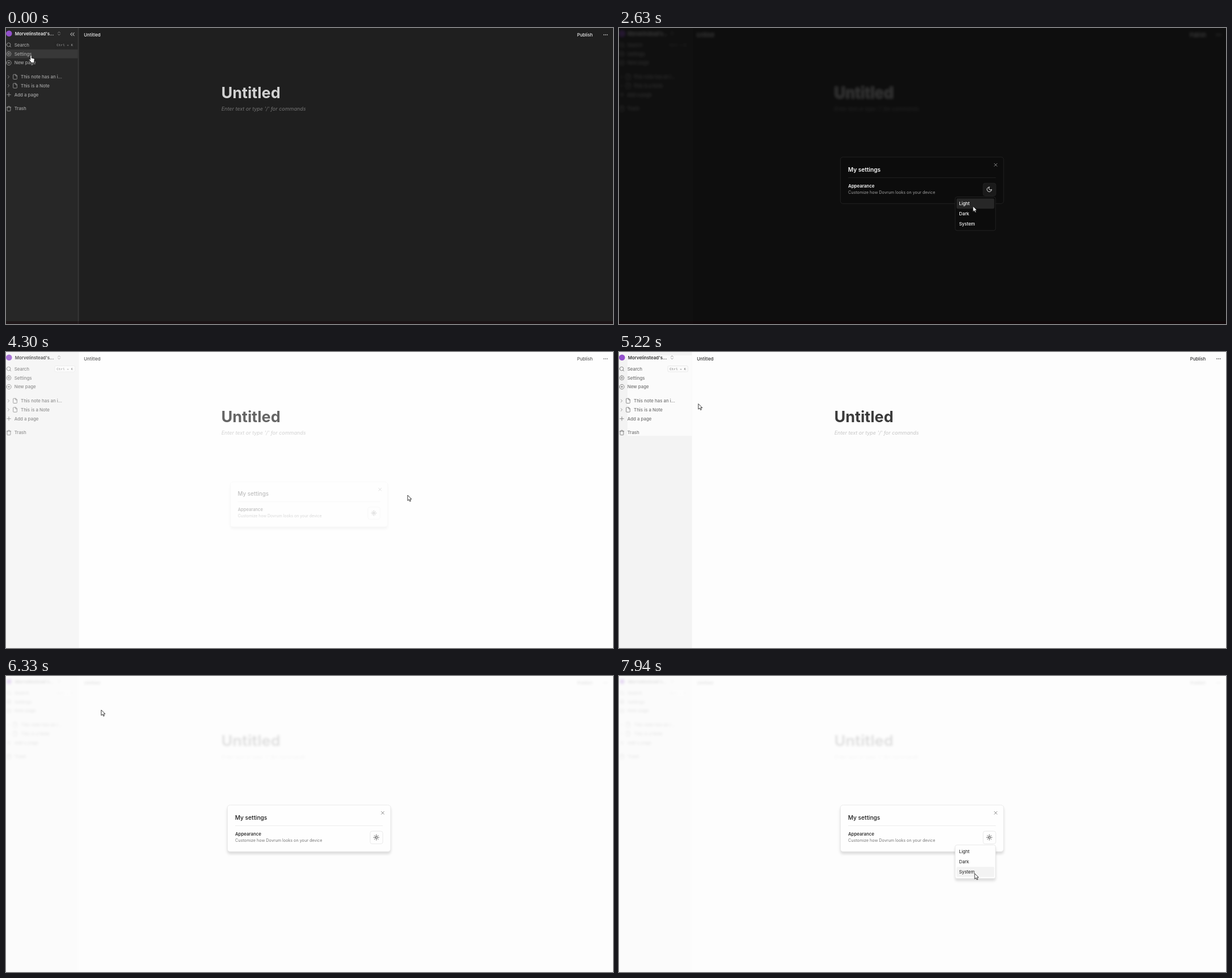
These frames come from a looping animation (1070x523 px, 8000 ms). An HTML page:

```html
<!DOCTYPE html>
<html lang="en">
<head>
<meta charset="utf-8">
<title>Settings theme switch</title>
<style>
html, body { margin: 0; width: 100%; height: 100%; overflow: hidden; background: #1f1f1f; }
svg { display: block; width: 100vw; height: 100vh; font-family: Inter, "Liberation Sans", sans-serif; }
.dark {
  --page: #1f1f1f; --side: #272727; --edge: #363636; --hover: #383838; --strong: #ececec; --muted: #a3a3a3;
  --title: #d2d2d2; --hint: #757575; --key: #262626; --keyline: #262626; --veil: #0a0a0a;
  --card: #0c0c0c; --line: #272727; --ink: #fafafa; --soft: #a1a1a1; --button: #1a1a1a; --item: #272727;
  --shade: none; --weight: 600; --menuweight: 500;
}
.light {
  --page: #fdfdfd; --side: #f3f3f3; --edge: #f3f3f3; --hover: #e8e8e8; --strong: #303030; --muted: #737373;
  --title: #3b3b3b; --hint: #c6c6c6; --key: #fbfbfb; --keyline: #e2e2e2; --veil: #fefefe;
  --card: #fefefe; --line: #e5e5e5; --ink: #1a1a1a; --soft: #757575; --button: #fefefe; --item: #f3f3f3;
  --shade: drop-shadow(0 4px 2px rgba(0, 0, 0, .13)); --weight: 500; --menuweight: 400;
}
</style>
</head>
<body>
<svg id="stage" class="dark" viewBox="0 0 1070 523" preserveAspectRatio="none">
  <defs>
    <filter id="blur" filterUnits="userSpaceOnUse" x="-20" y="-20" width="1110" height="563">
      <feGaussianBlur id="blurSize" stdDeviation="2"/>
    </filter>
  </defs>
  <g id="page"></g>
  <rect id="veil" width="1070" height="523" fill="var(--veil)"/>
  <rect id="strip" y="518" width="1070" height="5" fill="#160006" opacity=".4"/>
  <g id="dialog"></g>
  <g id="menu"></g>
  <g id="cursor" stroke="#222" stroke-width=".9" stroke-linejoin="round" fill="#fff">
    <path id="arrow" d="M0 0V9.6L2.3 7.6 3.9 11 5.5 10.3 4 7H7Z"/>
    <path id="hand" d="M-1.2 1.2a1.2 1.2 0 0 1 2.4 0V5l4 .9q1.2.4 1 1.8L5.6 11.2V13.5H0V12L-3.2 8.6Q-4 7.4-2.8 7l1.6 1.2Z"/>
  </g>
</svg>
<script>
const LOOP = 8000;
const $ = id => document.getElementById(id);
const NS = "http://www.w3.org/2000/svg";

function add(parent, tag, attrs, content) {
  const el = document.createElementNS(NS, tag);
  for (const name in attrs) el.setAttribute(name, attrs[name]);
  if (content) el.textContent = content;
  parent.appendChild(el);
  return el;
}

const rect = (parent, x, y, width, height, fill, more) =>
  add(parent, "rect", { x, y, width, height, fill: `var(--${fill})`, ...more });

// Text is placed by the middle of its capitals.
const label = (parent, x, middle, content, color, size = 7.875, weight = 500, more = {}) =>
  add(parent, "text", {
    x, y: middle + size * 0.36, fill: `var(--${color})`, "font-size": size,
    style: `font-weight:${weight}`, ...more
  }, content);

function gearPath() {
  const points = [];
  for (let i = 0; i < 96; i++) {
    const a = i / 96 * Math.PI * 2;
    const r = 8.8 + 1.5 * Math.tanh(2 * Math.cos(8 * a));
    points.push((12 + r * Math.sin(a)).toFixed(2) + " " + (12 - r * Math.cos(a)).toFixed(2));
  }
  return "M" + points.join("L") + "Z" + disc(12, 12, 3);
}

function disc(x, y, r) {
  return `M${x - r} ${y}a${r} ${r} 0 1 0 ${2 * r} 0a${r} ${r} 0 1 0 ${-2 * r} 0`;
}

function sunPath() {
  let d = disc(12, 12, 4);
  for (let i = 0; i < 8; i++) {
    const x = Math.cos(i * Math.PI / 4), y = Math.sin(i * Math.PI / 4);
    d += `M${12 + 8 * x} ${12 + 8 * y}L${12 + 10 * x} ${12 + 10 * y}`;
  }
  return d;
}

const ICONS = {
  search: disc(11, 11, 8) + "M21 21l-4.3-4.3",
  gear: gearPath(),
  plusDisc: disc(12, 12, 10) + "M8 12h8M12 8v8",
  plus: "M4 12h16M12 4v16",
  file: "M14.5 2H6a2 2 0 0 0-2 2v16a2 2 0 0 0 2 2h12a2 2 0 0 0 2-2V7.5ZM14 2v6h6",
  trash: "M3 6h18M19 6v14a2 2 0 0 1-2 2H7a2 2 0 0 1-2-2V6M8 6V4a2 2 0 0 1 2-2h4a2 2 0 0 1 2 2v2",
  right: "M9 18l6-6-6-6",
  upDown: "M7 15l5 5 5-5M7 9l5-5 5 5",
  collapse: "M11 17l-5-5 5-5M18 17l-5-5 5-5",
  dots: disc(5, 12, 1) + disc(12, 12, 1) + disc(19, 12, 1),
  close: "M18 6L6 18M6 6l12 12",
  moon: "M12 3a6 6 0 0 0 9 9 9 9 0 1 1-9-9Z",
  sun: sunPath()
};

const icon = (parent, name, x, y, size, color = "muted") =>
  add(parent, "path", {
    d: ICONS[name], fill: "none", stroke: `var(--${color})`, "stroke-width": 2,
    "stroke-linecap": "round", "stroke-linejoin": "round",
    transform: `translate(${x - size / 2} ${y - size / 2}) scale(${size / 24})`
  });

// Page with sidebar
const page = $("page");
rect(page, -20, -20, 1110, 563, "page");
rect(page, -20, -20, 148.5, 563, "side");
rect(page, 126.5, -20, 2, 563, "edge");
const panel = rect(page, 15, 6, 113.5, 142, "page", { opacity: 0.85 });

const rows = [
  [30, "Search", "search"], [45.7, "Settings", "gear"], [61.5, "New page", "plusDisc"],
  [86.3, "This note has an i...", "file"], [102, "This is a Note", "file"],
  [117.8, "Add a page", "plus"], [142.5, "Trash", "trash"]
].map(([y, name, glyph]) => {
  const back = rect(page, -20, y - 7.8, 146.5, 15.6, "hover");
  const nested = glyph === "file";
  if (nested) icon(page, "right", 4.5, y, 9);
  icon(page, glyph, nested ? 16 : 5, y, 10);
  label(page, nested ? 26 : 14.7, y, name, "muted");
  return { y, back };
});

add(page, "circle", { cx: 5.3, cy: 9.7, r: 5.3, fill: "#9350cc" });
label(page, 15.7, 9.7, "Morvelinstead's...", "strong", 7.875, 600);
icon(page, "upDown", 93.5, 9.7, 9);
const collapse = icon(page, "collapse", 117, 11, 13);
rect(page, 86, 24.5, 35.5, 10.5, "key", { rx: 2, stroke: "var(--keyline)", "stroke-width": 0.7 });
label(page, 89.2, 30, "Ctrl + K", "muted", 6, 400,
  { "font-family": "'Liberation Mono', 'DejaVu Sans Mono', monospace" });

label(page, 137.3, 12, "Untitled", "strong");
label(page, 1006.7, 12, "Publish", "strong");
icon(page, "dots", 1057, 12, 10, "strong");
label(page, 379.5, 114, "Untitled", "title", 27, 700);
label(page, 379.7, 142.6, "Enter text or type '/' for commands", "hint", 9, 400, { "font-style": "italic" });

// Settings dialog
const dialog = $("dialog");
const outline = { stroke: "var(--line)", "stroke-width": 0.8 };
rect(dialog, 390.3, 228, 287.7, 82.3, "card", { rx: 4.5, style: "filter:var(--shade)", ...outline });
label(dialog, 403.8, 250, "My settings", "ink", 10.125, "var(--weight)");
icon(dialog, "close", 664, 241.8, 10, "soft");
rect(dialog, 404, 264.2, 260.3, 0.7, "line");
label(dialog, 404, 279, "Appearance", "ink", 7.875, "var(--weight)");
label(dialog, 404, 290.3, "Customize how Dovrum looks on your device", "soft", 7.2, 400);
rect(dialog, 641.9, 274.2, 22.3, 22.3, "button", { rx: 3.4, ...outline });
const moon = icon(dialog, "moon", 652.8, 285.2, 11, "ink");
const sun = icon(dialog, "sun", 652.8, 285.2, 11, "ink");

// Theme menu
const menu = $("menu");
rect(menu, 592.6, 298.5, 71.2, 59.3, "card", { rx: 3.4, style: "filter:var(--shade)", ...outline });
const items = ["Light", "Dark", "System"].map((name, i) => {
  const y = 310.3 + 18 * i;
  const back = rect(menu, 595, y - 9, 66.5, 18, "item", { rx: 2.3 });
  label(menu, 599.5, y, name, "ink", 7.875, "var(--menuweight)");
  return { y, back };
});

// Pointer moves: start, end, steps, target, bend point, ease-out power
const MOVES = [
  [60, 120, 2, [45, 45]],
  [1100, 1270, 4, [629, 272], [361, 72]],
  [1460, 1640, 4, [650, 286]],
  [2380, 2630, 5, [624, 315]],
  [3630, 4180, 11, [708, 253], [690, 300], 1.5],
  [4780, 4960, 4, [222, 159]],
  [5220, 5710, 9, [82, 44], null, 7.5],
  [6330, 6750, 8, [650, 286], [434, 100]],
  [7340, 7940, 11, [627, 349], [640, 316]]
];

function pointer(t) {
  let from = [44, 48];
  for (const [start, end, steps, to, bend, power = 1] of MOVES) {
    if (t < start) break;
    const step = Math.min(steps, Math.floor((t - start) / (end - start) * (steps - 1) + 1e-6) + 1);
    const u = 1 - (1 - step / steps) ** power;
    const begin = from;
    from = to.map((goal, i) => {
      const mid = bend ? bend[i] : (begin[i] + goal) / 2;
      return (1 - u) ** 2 * begin[i] + 2 * u * (1 - u) * mid + u * u * goal;
    });
  }
  return from;
}

function ramp(t, start, end) {
  const u = Math.min(1, Math.max(0, (t - start) / (end - start)));
  return 1 - (1 - u) ** 2;
}

const dialogLevel = t => ramp(t, 440, 660) - ramp(t, 4200, 4410) + ramp(t, 5920, 6150);

function menuLevel(t) {
  if (t < 3010) return ramp(t, 1790, 1940);
  return t < 3070 ? 0.4 : ramp(t, 6820, 7050);
}

const show = (el, on) => el.setAttribute("visibility", on ? "inherit" : "hidden");

function popUp(el, level, x, y) {
  const scale = 0.95 + 0.05 * level;
  el.setAttribute("opacity", level);
  el.setAttribute("transform", `translate(${x} ${y}) scale(${scale}) translate(${-x} ${-y})`);
  show(el, level > 0);
}

function draw(t) {
  const dark = t < 3010;
  const open = dialogLevel(t);
  const listed = menuLevel(t);
  const [x, y] = pointer(t);
  const inSide = x < 127 && open < 0.01;

  $("stage").setAttribute("class", dark ? "dark" : "light");
  show($("strip"), dark);
  show(panel, t >= 4470 && t < 5970);
  show(moon, dark);
  show(sun, !dark);
  show(collapse, inSide);
  for (const row of rows) show(row.back, inSide && Math.abs(y - row.y) < 7.8);
  for (const item of items) show(item.back, Math.abs(y - item.y) < 9);

  $("blurSize").setAttribute("stdDeviation", 2.2 * open);
  if (open > 0.01) page.setAttribute("filter", "url(#blur)");
  else page.removeAttribute("filter");
  $("veil").setAttribute("opacity", 0.8 * open);

  popUp(dialog, open, 534, 269);
  popUp(menu, listed, 628, 328);

  show($("hand"), inSide);
  show($("arrow"), !inSide);
  $("cursor").setAttribute("transform", `translate(${x.toFixed(2)} ${y.toFixed(2)})`);
}

const origin = performance.now();
function tick() {
  draw((performance.now() - origin) % LOOP);
  requestAnimationFrame(tick);
}
tick();
</script>
</body>
</html>
```
